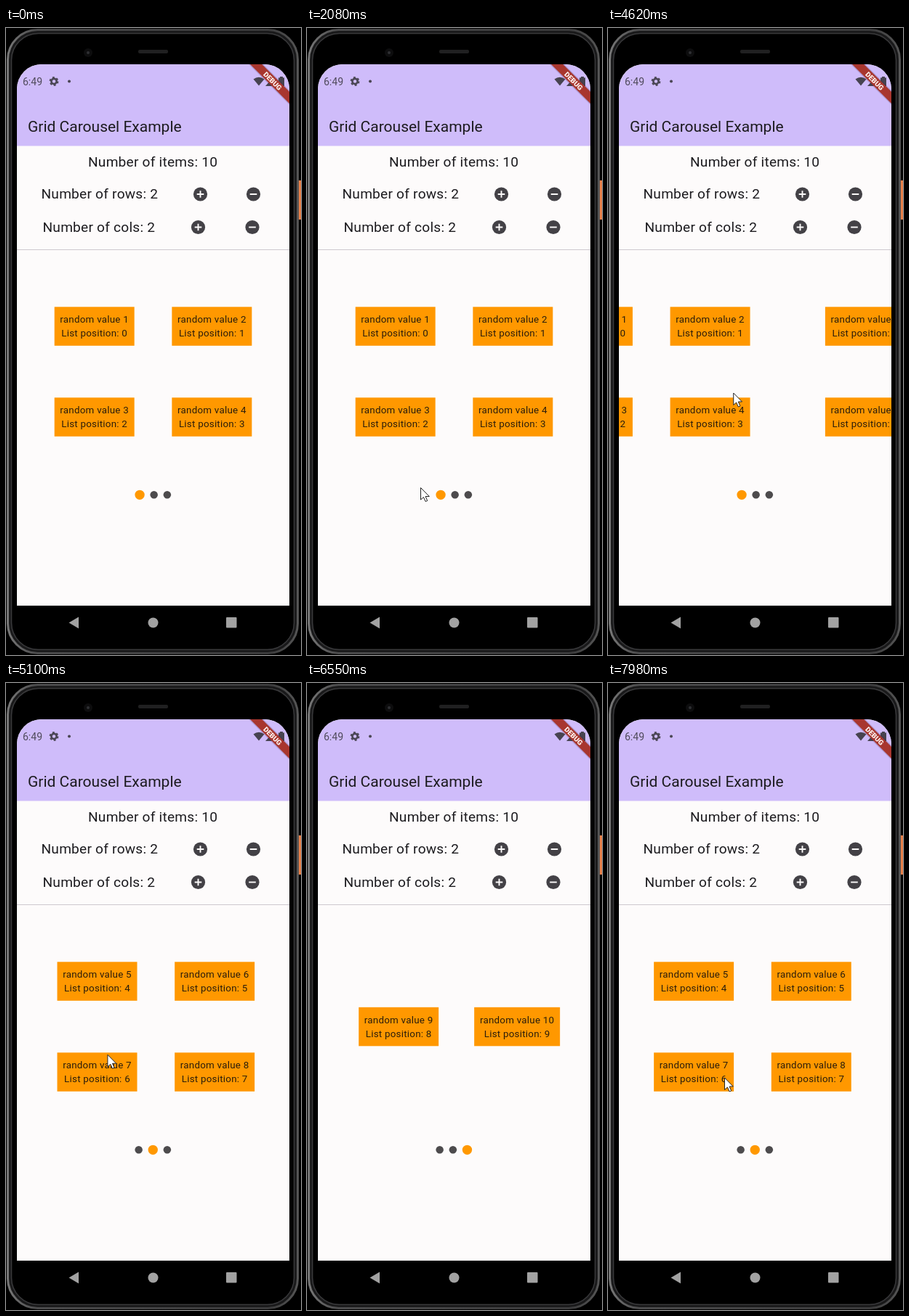
These frames come from a looping animation (406 px wide and 864 px high, 8 s). An HTML page:

```html
<!DOCTYPE html>
<html lang="en">
<head>
<meta charset="utf-8">
<title>Grid carousel</title>
<style>
  html, body { margin: 0; width: 100%; height: 100%; overflow: hidden; background: #000; }
  svg { display: block; width: 406px; height: 864px; }
  text { font-family: Roboto, sans-serif; fill: #1c1b1f; white-space: pre; }
  .head { font-size: 19.1px; letter-spacing: .24px; }
  .card { font-size: 13.37px; letter-spacing: .24px; text-anchor: middle; fill: #2a1d0c; }
</style>
</head>
<body>
<svg viewBox="0 0 406 864" xmlns="http://www.w3.org/2000/svg">
  <defs>
    <clipPath id="screen"><path d="M15 796V84a34 34 0 0 1 34-34H356a34 34 0 0 1 34 34V796Z"/></clipPath>
    <linearGradient id="rim">
      <stop offset="0" stop-color="#777"/><stop offset=".1" stop-color="#4a4a4b"/>
      <stop offset=".9" stop-color="#3a3a3b"/><stop offset="1" stop-color="#555"/>
    </linearGradient>
  </defs>

  <rect width="406" height="864"/>
  <rect x="2.500" y="2.500" width="399" height="859" rx="41" fill="#19191a" stroke="url(#rim)" stroke-width="3"/>
  <rect x="7.500" y="7.500" width="389" height="849" rx="37" fill="#000" stroke="#39393b" stroke-width="1.500"/>
  <rect x="182" y="30" width="41" height="5" rx="2" fill="#202021"/>
  <circle cx="113" cy="34" r="6" fill="#0d0d0e"/>
  <circle cx="113" cy="34" r="2" fill="#2f3033"/>
  <rect x="403" y="210" width="3" height="54" fill="#e8804a"/>

  <g clip-path="url(#screen)">
    <rect x="15" y="50" width="375" height="746" fill="#fdfbfb"/>
    <rect x="15" y="50" width="375" height="112.500" fill="#cfbcfa"/>
    <text x="23" y="79" font-size="14" style="fill:#504b5c">6:49</text>
    <g fill="none" stroke="#4a4654">
      <circle cx="66" cy="73.500" r="3.600" stroke-width="2.600"/>
      <circle cx="66" cy="73.500" r="5.400" stroke-width="2" stroke-dasharray="2.830"/>
    </g>
    <circle cx="87" cy="73.500" r="2" fill="#4a4654"/>
    <g fill="#474350">
      <path d="M340.500 70.500Q348 65 355.500 70.500L348 79.500Z"/>
      <path d="M357 80L369 67V80Z"/>
      <path d="M375 68.500h2v-1.500h4v1.500h2V80h-8Z"/>
    </g>
    <text x="30" y="143" font-size="21">Grid Carousel Example</text>
    <text class="head" x="113" y="190.500">Number of items: 10</text>
    <text class="head" x="48.500" y="235">Number of rows: 2</text>
    <text class="head" x="50.500" y="281">Number of cols: 2</text>
    <g id="buttons"></g>
    <rect x="15" y="305" width="375" height="1" fill="#cdc8cf"/>
    <g id="pages"></g>
    <g id="dots"></g>
    <g transform="translate(390 50) rotate(45)">
      <rect x="-60" y="25.500" width="120" height="14" fill="#30183a" opacity=".2"/>
      <rect x="-60" y="26.700" width="120" height="11.500" fill="#a8362f"/>
      <text y="36" font-size="9.740" font-weight="900" text-anchor="middle" style="fill:#fff4f0">DEBUG</text>
    </g>
  </g>

  <g fill="#a2a2a2">
    <path d="M86.500 819.500L100 811.500V827.500Z"/>
    <circle cx="202.500" cy="819.500" r="7"/>
    <rect x="303" y="812" width="14.500" height="14.500" rx="1"/>
  </g>
  <path id="cursor" d="M0 0V16.500L3.900 13L6.600 19L9.200 17.900L6.600 12H11.800Z"
    fill="#fff" stroke="#222" stroke-linejoin="round"/>
</svg>
<script>
const LOOP = 8000, WIDTH = 375, LEFT = 15, ORANGE = '#ff9800';
const $ = id => document.getElementById(id);

function add(parent, tag, attrs, text) {
  const el = document.createElementNS('http://www.w3.org/2000/svg', tag);
  for (const k in attrs) el.setAttribute(k, attrs[k]);
  if (text) el.textContent = text;
  parent.appendChild(el);
  return el;
}

function button(x, y, plus) {
  add($('buttons'), 'circle', { cx: x, cy: y, r: 9.6, fill: '#434146' });
  add($('buttons'), 'path', {
    d: `M${x - 4.8} ${y}h9.6` + (plus ? `M${x} ${y - 4.8}v9.6` : ''),
    stroke: '#fdfbfb', 'stroke-width': 1.9
  });
}
for (const row of [0, 1]) {
  button(267.5 - 3 * row, 229 + 45.5 * row, true);
  button(340.5 - 1.5 * row, 229 + 45.5 * row, false);
}

// Ten cards in rows of two, spaced evenly; the last page has a single centred row
for (let i = 0; i < 10; i++) {
  const row = i >> 1, page = row >> 1, col = i % 2;
  const y = row === 4 ? 446.8 : 384.3 + 125 * (row % 2);
  const wide = row === 4 ? 118 : 110, w = col ? wide : 110;
  const gap = (WIDTH - 110 - wide) / 3;
  const x = LEFT + page * WIDTH + gap + col * (110 + gap);
  const g = add($('pages'), 'g', { transform: `translate(${x} ${y})` });
  add(g, 'rect', { width: w, height: 53.5, fill: ORANGE });
  add(g, 'text', { class: 'card', x: w / 2, y: 22 }, `random value ${i + 1}`);
  add(g, 'text', { class: 'card', x: w / 2, y: 41 }, `List position: ${i}`);
}

const dots = [0, 1, 2].map(() => add($('dots'), 'circle', { cy: 643.3 }));

// Drags between pages: speeds in px/ms, grip is where the pointer takes hold
const swipes = [
  { t0: 4500, t1: 4700, from: 0, to: 1, speed: 1.18, grip: 315.5, y: 503 },
  { t0: 5919, t1: 6160, from: 1, to: 2, speed: .8, grip: 225, y: 497.5 },
  { t0: 7327, t1: 7502, from: 2, to: 1, speed: -1.096, grip: 126.5, y: 556, fling: -.5 }
];
const travel = (s, t) => s.speed * (Math.min(t, s.t1) - s.t0);

// Follows the drag, then settles on the page like an overdamped spring
function scrollAt(t) {
  const s = swipes.filter(s => t >= s.t0).pop();
  if (!s) return 0;
  const pos = s.from * WIDTH + travel(s, t);
  if (t <= s.t1) return pos;
  const slow = .00907, fast = .02204, dt = t - s.t1, end = s.to * WIDTH;
  const rest = pos - end, a = ((s.fling || s.speed) + fast * rest) / (fast - slow);
  return end + a * Math.exp(-slow * dt) + (rest - a) * Math.exp(-fast * dt);
}

// Pointer moves, eased when free and linear while dragging
const move = (t0, t1, x, y, linear) => ({ t0, t1, x, y, linear });
const entry = { t: 1730, x: 108, y: 760 };
const moves = [
  move(entry.t, 2310, 182, 567),
  move(2600, 3310, 358, 499),
  move(3410, 3450, 338, 499),
  move(4110, 4500, 315.5, 503),
  move(4700, 5720, 256, 530),
  move(5750, 5919, 225, 497.5),
  move(6160, 6240, -20, 515),
  move(6580, 7327, 126.5, 556),
  move(7502, 7580, 345, 557),
  move(7580, 7980, 160.5, 544),
  ...swipes.map(s => move(s.t0, s.t1, s.grip - travel(s, s.t1), s.y, true))
].sort((a, b) => a.t0 - b.t0);

function pointerAt(t) {
  let { x, y } = entry;
  for (const m of moves) {
    if (t < m.t0) break;
    const u = Math.min(1, (t - m.t0) / (m.t1 - m.t0));
    const k = m.linear ? u : u * u * (3 - 2 * u);
    x += (m.x - x) * k;
    y += (m.y - y) * k;
  }
  return `translate(${x.toFixed(2)} ${y.toFixed(2)})`;
}

function draw(t) {
  const scroll = scrollAt(t), page = Math.round(scroll / WIDTH - .01);
  $('pages').setAttribute('transform', `translate(${-scroll.toFixed(2)} 0)`);
  let x = 177.4;
  dots.forEach((dot, i) => {
    const r = i === page ? 6.65 : 5.25;
    dot.setAttribute('cx', x + r);
    dot.setAttribute('r', r);
    dot.setAttribute('fill', i === page ? ORANGE : '#4d4b4d');
    x += 2 * r + 7.7;
  });
  $('cursor').setAttribute('visibility', t >= entry.t ? 'visible' : 'hidden');
  $('cursor').setAttribute('transform', pointerAt(t));
}

const start = performance.now();
function tick() {
  draw((performance.now() - start) % LOOP);
  requestAnimationFrame(tick);
}
tick();
</script>
</body>
</html>
```
